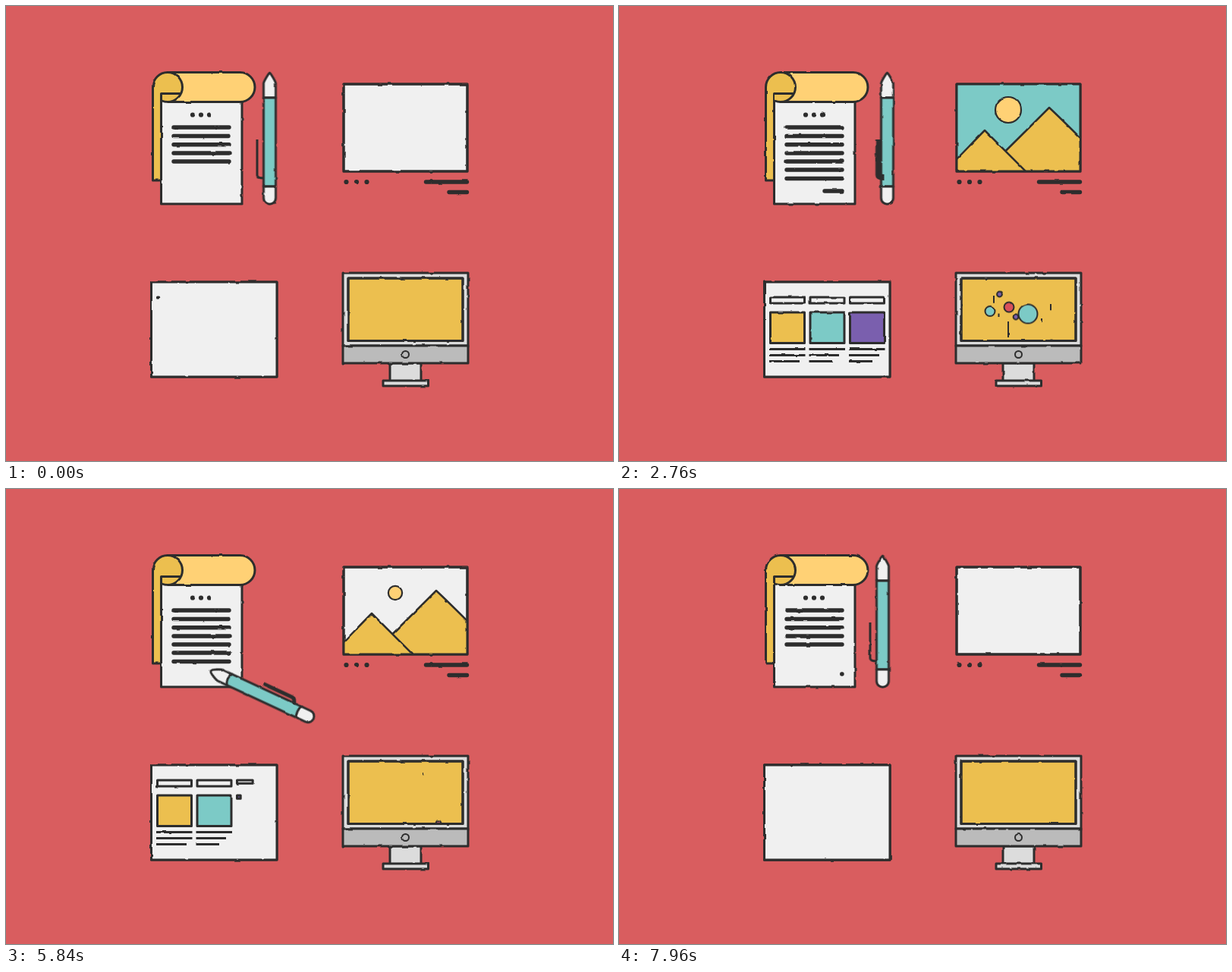
These frames come from a looping animation (800x600 px, 8 s). An HTML page without scripts:

```html
<!DOCTYPE html>
<html lang="en">
<head>
<meta charset="utf-8">
<title>Design icons</title>
<style>
html, body { margin: 0; width: 100%; height: 100%; overflow: hidden; background: #d95d5f; }
svg { display: block; width: 800px; height: 600px; }
.ink { stroke: #2d2d2d; stroke-width: 3; stroke-linejoin: round; }
.none { fill: none; }
.dark { fill: #2d2d2d; stroke: none; }
.white { fill: #f0f0f0; }
.gold { fill: #ecbf4f; }
.cream { fill: #ffd175; }
.teal { fill: #7ccac6; }
.violet { fill: #7a5fae; }
.rose { fill: #d9505a; }
.plum { fill: #a9566a; }
.silver { fill: #dcdcdc; }
.grey { fill: #bbb; }
.text { fill: none; stroke-width: 5.4; stroke-linecap: round; }

/* notepad */
.write { stroke-dasharray: 1 3; animation: 4s linear infinite; }
.w6 { animation-name: w6; }
.w7 { animation-name: w7; }
.sign { animation-name: sign; }
@keyframes w6 {
  0%, 12% { stroke-dashoffset: 1.2; }
  25%, 83% { stroke-dashoffset: 0; }
  91%, to { stroke-dashoffset: -1.2; }
}
@keyframes w7 {
  0%, 33% { stroke-dashoffset: 1.2; }
  42%, 86% { stroke-dashoffset: 0; }
  94%, to { stroke-dashoffset: -1.2; }
}
@keyframes sign {
  0%, 46% { stroke-dashoffset: 1.3; }
  52%, 92.5% { stroke-dashoffset: 0; }
  99% { stroke-dashoffset: -.98; }
  99.9%, to { stroke-dashoffset: -1.3; }
}
.pen { animation: pen 4s ease-in-out infinite; }
@keyframes pen {
  0%, 4% { transform: translate(347.5px, 88px) rotate(0deg); }
  12% { transform: translate(220px, 216px) rotate(-50deg); }
  25%, 26% { transform: translate(289px, 213px) rotate(-44deg); }
  33% { transform: translate(220px, 227px) rotate(-50deg); }
  42% { transform: translate(294px, 228px) rotate(-60deg); }
  46% { transform: translate(270px, 240px) rotate(-65deg); }
  52% { transform: translate(295px, 243px) rotate(-65deg); }
  57% { transform: translate(300px, 244px) rotate(-60deg); }
  68% { transform: translate(355px, 88px) rotate(0deg); }
  69% { transform: translate(353.5px, 88px) rotate(0deg); }
  74%, to { transform: translate(347.5px, 88px) rotate(0deg); }
}

/* picture */
.sky { animation: sky 4s linear infinite; }
@keyframes sky {
  0%, 47% { transform: translate(190px, 140px); }
  64%, 72% { transform: translate(-100px, -70px); }
  76% { transform: none; }
  86%, to { transform: translate(190px, 140px); }
}
.sun { animation: sun 4s ease-in-out infinite; }
@keyframes sun {
  0%, 42% { r: 0; stroke-width: 0; }
  43% { r: 1px; stroke-width: 2.2px; }
  49%, 78% { r: 17px; stroke-width: 2.2px; }
  86% { r: 1px; stroke-width: 2.2px; }
  87%, to { r: 0; stroke-width: 0; }
}

/* web page */
.slide { animation: slide 4s linear infinite; }
@keyframes slide {
  0%, 72% { transform: none; }
  76% { transform: translateX(34px); }
  79.5% { transform: translateX(90px); }
  84% { transform: translateX(-33px); }
  89% { transform: translateX(-64px); }
  95% { transform: translateX(-43px); }
  99%, to { transform: none; }
}
.cover { animation: cover 4s infinite step-end; }
@keyframes cover { 0% { opacity: 0; } 79.5%, to { opacity: 1; } }
.col2 { --d: .84s; animation: show2 4s infinite step-end; }
.col3 { --d: 1.68s; animation: show3 4s infinite step-end; }
@keyframes show2 { 0% { opacity: 0; } 21%, to { opacity: 1; } }
@keyframes show3 { 0% { opacity: 0; } 42%, to { opacity: 1; } }
.head { animation: head 4s linear var(--d, 0s) infinite both; }
@keyframes head {
  0% { width: 1px; height: 1px; }
  9%, to { width: 45px; height: 8px; }
}
.box { animation: box 4s linear var(--d, 0s) infinite both; }
@keyframes box {
  0%, 3.19% { width: 1px; height: 1px; opacity: 0; }
  3.2% { width: 1px; height: 1px; opacity: 1; }
  13%, to { width: 45px; height: 40.5px; opacity: 1; }
}
.row { fill: none; stroke-dasharray: 1 3; animation: row 4s linear var(--d, 0s) infinite both; }
@keyframes row { 0%, 8% { stroke-dashoffset: 1.1; } 16%, to { stroke-dashoffset: 0; } }
.up { transform-origin: 304px 388px; animation: up 4s linear infinite; }
.down { transform-origin: 304px 454px; animation: down 4s linear infinite; }
@keyframes up { 0%, 72%, 82%, to { transform: none; } 76% { transform: skewY(-4deg); } }
@keyframes down { 0%, 72%, 82%, to { transform: none; } 76% { transform: skewY(3deg); } }

/* monitor */
.balls circle { stroke-width: 2; animation: hop 2s var(--t) infinite; }
@keyframes hop {
  0% { transform: translateY(83px); animation-timing-function: cubic-bezier(.333, .667, .667, 1); }
  32.5% { transform: none; animation-timing-function: cubic-bezier(.333, 0, .667, .333); }
  65%, to { transform: translateY(83px); }
}
.streaks path { stroke-width: 2; stroke-dasharray: 1 3; animation: streak 2s var(--t) infinite; }
@keyframes streak {
  0% { stroke-dashoffset: 1.02; animation-timing-function: ease-out; }
  15% { stroke-dashoffset: 0; animation-timing-function: cubic-bezier(.2, .7, .4, 1); }
  30%, to { stroke-dashoffset: -1.02; }
}
</style>
</head>
<body>
<svg viewBox="0 0 800 600">
<defs>
  <filter id="rough" x="0" y="0" width="800" height="600" filterUnits="userSpaceOnUse" color-interpolation-filters="sRGB">
    <feTurbulence type="fractalNoise" baseFrequency=".09" numOctaves="1" seed="1" result="n">
      <animate attributeName="seed" values="1;2;3;4" calcMode="discrete" dur=".48s" repeatCount="indefinite"/>
    </feTurbulence>
    <feDisplacementMap in="SourceGraphic" in2="n" scale="2.6" xChannelSelector="R" yChannelSelector="G"/>
  </filter>
  <clipPath id="frame"><path d="M445 103H608V218H445Z"/></clipPath>
  <clipPath id="screen"><path d="M451 359H602V441H451Z"/></clipPath>
</defs>
<rect width="800" height="600" fill="#d95d5f"/>
<g class="ink" filter="url(#rough)">

  <!-- notepad -->
  <path class="white" d="M204.500 120H311V261H204.500Z"/>
  <path class="cream" d="M213 87.500H308.500a19.500 19.500 0 0 1 0 39H213Z"/>
  <circle class="gold" cx="213" cy="107" r="19.500"/>
  <path class="gold" stroke="none" d="M194 107H205V230H194Z"/>
  <path class="none" d="M193.500 107V230H204.500V115.500H230"/>
  <g class="dark"><circle cx="246" cy="143.500" r="3.100"/><circle cx="257" cy="143.500" r="3.100"/><circle cx="268" cy="143.500" r="3.100"/></g>
  <path class="text" d="M221 160H294M221 171.500H294M221 182.800H294M221 194H294M221 205H294"/>
  <path class="text write w6" pathLength="1" d="M221 216H294"/>
  <path class="text write w7" pathLength="1" d="M221 227.500H294"/>
  <path class="text write sign" pathLength="1" d="M271 244H294"/>

  <g class="pen">
    <path class="white" d="M-8 33V14C-8 12 -1 0 0 0C1 0 8 12 8 14V33Z">
      <animate attributeName="d" dur="4s" repeatCount="indefinite" keyTimes="0;.04;.12;.26;.36;.57;.69;1" values="M-8 33V14C-8 12 -1 0 0 0C1 0 8 12 8 14V33Z;M-8 33V14C-8 12 -1 0 0 0C1 0 8 12 8 14V33Z;M-8 27V14C-8 12 -3 0 0 0C3 0 8 12 8 14V27Z;M-8 15V8C-8 3 -4 0 0 0C4 0 8 3 8 8V15Z;M-8 27V14C-8 12 -3 0 0 0C3 0 8 12 8 14V27Z;M-8 27V14C-8 12 -3 0 0 0C3 0 8 12 8 14V27Z;M-8 33V14C-8 12 -1 0 0 0C1 0 8 12 8 14V33Z;M-8 33V14C-8 12 -1 0 0 0C1 0 8 12 8 14V33Z"/>
    </path>
    <path class="teal" d="M-8 33Q0 33 8 33V150H-8Z">
      <animate attributeName="d" dur="4s" repeatCount="indefinite" keyTimes="0;.04;.12;.26;.36;.57;.69;1" values="M-8 33Q0 33 8 33V150H-8Z;M-8 33Q0 33 8 33V150H-8Z;M-8 27Q0 22 8 27V129H-8Z;M-8 15Q0 8 8 15V60H-8Z;M-8 27Q0 22 8 27V129H-8Z;M-8 27Q0 22 8 27V129H-8Z;M-8 33Q0 33 8 33V150H-8Z;M-8 33Q0 33 8 33V150H-8Z"/>
    </path>
    <path class="white" d="M-8 150C-8 150 8 150 8 150V165C8 176 -8 176 -8 165Z">
      <animate attributeName="d" dur="4s" repeatCount="indefinite" keyTimes="0;.04;.12;.26;.36;.57;.69;1" values="M-8 150C-8 150 8 150 8 150V165C8 176 -8 176 -8 165Z;M-8 150C-8 150 8 150 8 150V165C8 176 -8 176 -8 165Z;M-8 129C-7 125 7 125 8 129V141C8 152 -8 152 -8 141Z;M-9 62C-9 50 9 50 9 62V62C9 74 -9 74 -9 62Z;M-8 129C-7 125 7 125 8 129V141C8 152 -8 152 -8 141Z;M-8 129C-7 125 7 125 8 129V141C8 152 -8 152 -8 141Z;M-8 150C-8 150 8 150 8 150V165C8 176 -8 176 -8 165Z;M-8 150C-8 150 8 150 8 150V165C8 176 -8 176 -8 165Z"/>
    </path>
    <path class="none" d="M-16.500 88V135Q-16.500 139 -8 139">
      <animate attributeName="d" dur="4s" repeatCount="indefinite" keyTimes="0;.04;.12;.26;.36;.57;.69;.74;1" values="M-16.500 88V135Q-16.500 139 -8 139;M-16.500 88V135Q-16.500 139 -8 139;M14 70V111Q14 117 6 117;M8 23V44Q8 48 5 48;M14 70V111Q14 117 6 117;M14 70V111Q14 117 6 117;M-11.500 88V135Q-11.500 138 -4 138;M-16.500 88V135Q-16.500 139 -8 139;M-16.500 88V135Q-16.500 139 -8 139"/>
      <animate attributeName="stroke-width" dur="4s" repeatCount="indefinite" keyTimes="0;.04;.12;.26;.36;.57;.69;.74;1" values="3;3;5;8;5;5;8;3;3"/>
    </path>
  </g>

  <!-- picture -->
  <path class="white" d="M445 103H608V218H445Z"/>
  <g clip-path="url(#frame)">
    <path class="teal sky" stroke="none" d="M300 230L446 155C470 145 485 135 502 128C515 122 519 114 519 103L530 20H900V500H300Z"/>
    <circle class="cream sun" cx="513" cy="137" r="0"/>
    <path class="gold" stroke-width="2.500" d="M480 224C509 224 550 224 567 224C582 224 597 224 612 224V226Z">
      <animate attributeName="d" dur="4s" repeatCount="indefinite" keyTimes="0;.14;.26;.36;.78;.85;.92;1" values="M480 224C509 224 550 224 567 224C582 224 597 224 612 224V226Z;M480 224C509 224 550 224 567 224C582 224 597 224 612 224V226Z;M503 224C525 202 550 168 571 168C585 168 598 176 612 184V226Z;M476 224C509 192 538 163 567 134C582 148 597 163 612 178V226Z;M476 224C509 192 538 163 567 134C582 148 597 163 612 178V226Z;M503 224C525 202 550 168 571 168C585 168 598 176 612 184V226Z;M480 224C509 224 550 224 567 224C582 224 597 224 612 224V226Z;M480 224C509 224 550 224 567 224C582 224 597 224 612 224V226Z"/>
    </path>
    <path class="gold" stroke-width="2.500" d="M440 226V224C448 224 458 224 469 224C483 224 500 224 512 224Z">
      <animate attributeName="d" dur="4s" repeatCount="indefinite" keyTimes="0;.14;.26;.36;.78;.85;.92;1" values="M440 226V224C448 224 458 224 469 224C483 224 500 224 512 224Z;M440 226V224C448 224 458 224 469 224C483 224 500 224 512 224Z;M440 226V210C448 201 458 189 469 189C483 189 498 206 515 224Z;M440 226V207C454 193 468 178 482 164C500 182 520 202 542 224Z;M440 226V207C454 193 468 178 482 164C500 182 520 202 542 224Z;M440 226V210C448 201 458 189 469 189C483 189 498 206 515 224Z;M440 226V224C448 224 458 224 469 224C483 224 500 224 512 224Z;M440 226V224C448 224 458 224 469 224C483 224 500 224 512 224Z"/>
    </path>
  </g>
  <path class="none" d="M445 103H608V218H445Z"/>
  <g class="dark"><circle cx="448.500" cy="232" r="3.100"/><circle cx="462" cy="232" r="3.100"/><circle cx="475.500" cy="232" r="3.100"/></g>
  <path class="text" d="M553.500 232H607.500M584 245.500H607.500"/>

  <!-- web page -->
  <path class="white" d="M191.500 364H357V489H191.500Z"/>
  <g class="slide">
    <path class="white" d="M191.500 364C205 364 230 364 274 364C310 364 340 364 357 364V489C340 489 310 489 274 489C230 489 205 489 191.500 489Z">
      <animate attributeName="d" dur="4s" repeatCount="indefinite" keyTimes="0;.72;.76;.795;.84;.89;.95;.99;1" values="M191.500 364C205 364 230 364 274 364C310 364 340 364 357 364V489C340 489 310 489 274 489C230 489 205 489 191.500 489Z;M191.500 364C205 364 230 364 274 364C310 364 340 364 357 364V489C340 489 310 489 274 489C230 489 205 489 191.500 489Z;M191.500 364C205 364 230 364 274 364C310 364 335 362 354.500 356V497C335 490 310 489 274 489C230 489 205 489 191.500 489Z;M191.500 364C205 364 230 364 274 364C310 364 335 357 350 345V510C335 496 310 489 274 489C230 489 205 489 191.500 489Z;M191.500 333C205 350 230 364 274 364C310 364 340 364 357 364V489C340 489 310 489 274 489C230 489 205 503 191.500 522Z;M191.500 333C205 350 230 364 274 364C310 364 340 364 357 364V489C340 489 310 489 274 489C230 489 205 503 191.500 522Z;M191.500 360.500C205 363 230 364 274 364C310 364 340 364 357 364V489C340 489 310 489 274 489C230 489 205 490 191.500 492Z;M191.500 364C205 364 230 364 274 364C310 364 340 364 357 364V489C340 489 310 489 274 489C230 489 205 489 191.500 489Z;M191.500 364C205 364 230 364 274 364C310 364 340 364 357 364V489C340 489 310 489 274 489C230 489 205 489 191.500 489Z"/>
    </path>
    <g>
      <rect class="white head" x="199.500" y="384" width="45" height="8"/>
      <rect class="gold box" x="199.500" y="404" width="45" height="40.500"/>
      <path class="row" pathLength="1" d="M198 452.500H245.500"/>
      <path class="row" pathLength="1" d="M198 460.500H245.500"/>
      <path class="row" pathLength="1" d="M198 468.500H238"/>
    </g>
    <g class="col2">
      <rect class="white head" x="252" y="384" width="45" height="8"/>
      <rect class="teal box" x="252" y="404" width="45" height="40.500"/>
      <path class="row" pathLength="1" d="M250.500 452.500H298"/>
      <path class="row" pathLength="1" d="M250.500 460.500H290"/>
      <path class="row" pathLength="1" d="M250.500 468.500H281"/>
    </g>
    <g class="col3">
      <g class="up"><rect class="white head" x="304.500" y="384" width="45" height="8"/></g>
      <rect class="violet box" x="304.500" y="404" width="45" height="40.500"/>
      <g class="down">
        <path class="row" pathLength="1" d="M303 452.500H350.500"/>
        <path class="row" pathLength="1" d="M303 460.500H343"/>
        <path class="row" pathLength="1" d="M303 468.500H334"/>
      </g>
    </g>
  </g>
  <path class="white cover" d="M191.500 364H357V489H191.500Z"/>

  <!-- monitor -->
  <path class="silver" d="M506 471H547V494H506ZM497 494H556.500V501H497Z"/>
  <path class="silver" d="M444 352H609V448H444Z"/>
  <path class="grey" d="M444 448H609V471H444Z"/>
  <circle class="none" cx="526.500" cy="459.500" r="4.500" stroke-width="2"/>
  <path class="gold" d="M451 359H602V441.500H451Z"/>
  <g clip-path="url(#screen)">
    <g class="streaks none">
      <path pathLength="1" style="--t:-1.62s" d="M494 412V382"/>
      <path pathLength="1" style="--t:-1.66s" d="M557 442V412"/>
      <path pathLength="1" style="--t:-1.63s" d="M569 423V393"/>
      <path pathLength="1" style="--t:-1.27s" d="M500.500 410V380"/>
      <path pathLength="1" style="--t:-1.395s" d="M513 437V407"/>
      <path pathLength="1" style="--t:-.62s" d="M550 404V374"/>
    </g>
    <g class="balls">
      <circle class="teal" style="--t:-1.768s" cx="489" cy="399.500" r="6.500"/>
      <circle class="violet" style="--t:-2.014s" cx="501.500" cy="377" r="3.400"/>
      <circle class="rose" style="--t:-2.033s" cx="514" cy="393" r="6.500"/>
      <circle class="violet" style="--t:-1.495s" cx="523" cy="379.500" r="3.400"/>
      <circle class="teal" style="--t:-1.841s" cx="539" cy="405.500" r="12.500"/>
      <circle class="plum" style="--t:-1.341s" cx="570" cy="385" r="3.400"/>
    </g>
  </g>
  <path class="none" d="M451 359H602V441.500H451Z"/>
</g>
</svg>
</body>
</html>
```
